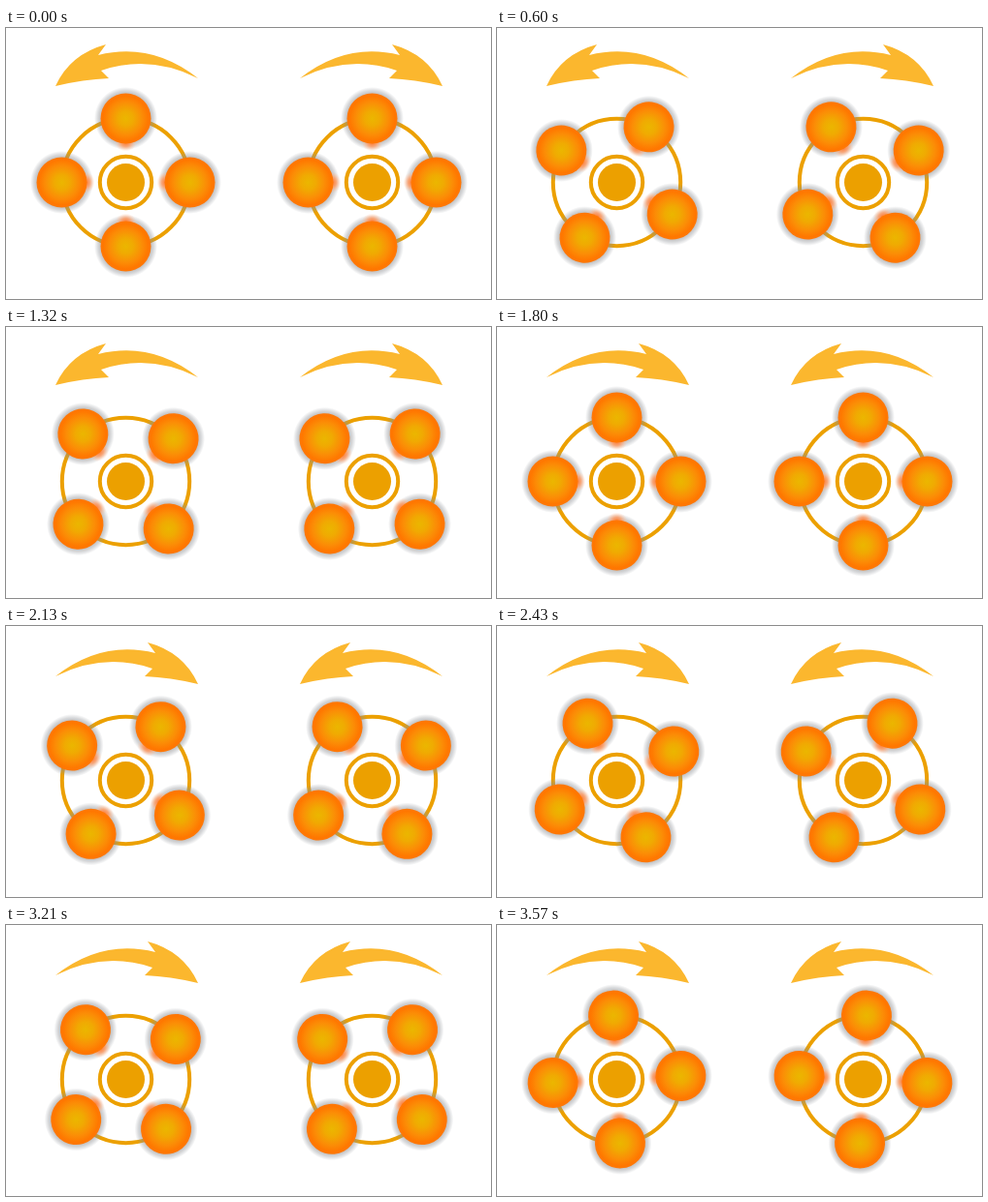
An HTML page for the animation above (3600 ms loop, 500x280 px).

```html
<!DOCTYPE html>
<html lang="en">
<head>
<meta charset="utf-8">
<title>Counter-rotating wheels</title>
<style>
  html, body { margin: 0; width: 100%; height: 100%; overflow: hidden; background: #fff; }
  svg { display: block; }
</style>
</head>
<body>
<svg width="500" height="280" viewBox="0 0 500 280">
  <defs>
    <radialGradient id="fill">
      <stop offset="0" stop-color="#ebb600"/>
      <stop offset=".3" stop-color="#f0aa02"/>
      <stop offset=".65" stop-color="#fb8d06"/>
      <stop offset=".9" stop-color="#ff7700"/>
      <stop offset="1" stop-color="#ff7808"/>
    </radialGradient>
    <radialGradient id="shade">
      <stop offset=".76" stop-color="#8c8884" stop-opacity=".6"/>
      <stop offset=".88" stop-color="#8c9096" stop-opacity=".35"/>
      <stop offset="1" stop-color="#8c9096" stop-opacity="0"/>
    </radialGradient>
    <radialGradient id="glow">
      <stop offset="0" stop-color="#ff7a30"/>
      <stop offset=".45" stop-color="#ff9a62" stop-opacity=".8"/>
      <stop offset="1" stop-color="#ffc8a8" stop-opacity="0"/>
    </radialGradient>
    <g id="ball">
      <circle cy="-66" r="32.5" fill="url(#shade)"/>
      <ellipse cy="-41" rx="11" ry="9" fill="url(#glow)"/>
      <circle cy="-66" r="26" fill="url(#fill)"/>
    </g>
    <g id="half">
      <path id="arrow" fill="#fbb72e"
        d="M51 60Q66 27 103 17L95 28Q150 14 198 52Q148 27 98 44L106 52Q80 53 51 60Z"/>
      <g transform="translate(123.5 159.5)">
        <g fill="none" stroke="#eca000" stroke-width="4">
          <circle r="65.7"/>
          <circle r="26.7"/>
        </g>
        <circle r="19.5" fill="#eca000"/>
        <g id="balls">
          <use href="#ball"/>
          <use href="#ball" transform="rotate(90)"/>
          <use href="#ball" transform="rotate(180)"/>
          <use href="#ball" transform="rotate(270)"/>
        </g>
      </g>
    </g>
  </defs>
  <use href="#half"/>
  <use href="#half" transform="translate(501) scale(-1 1)"/>
</svg>
<script>
  const LOOP = 3600, STEP = 30, DEG_PER_MS = 0.1;
  const arrow = document.getElementById('arrow');
  const balls = document.getElementById('balls');

  function draw() {
    const t = Math.floor(performance.now() % LOOP / STEP) * STEP;
    const reversed = t >= LOOP / 2;
    const angle = (t % (LOOP / 2)) * DEG_PER_MS * (reversed ? 1 : -1);
    balls.setAttribute('transform', `rotate(${angle})`);
    arrow.setAttribute('transform', reversed ? 'translate(249) scale(-1 1)' : '');
    requestAnimationFrame(draw);
  }
  draw();
</script>
</body>
</html>
```
